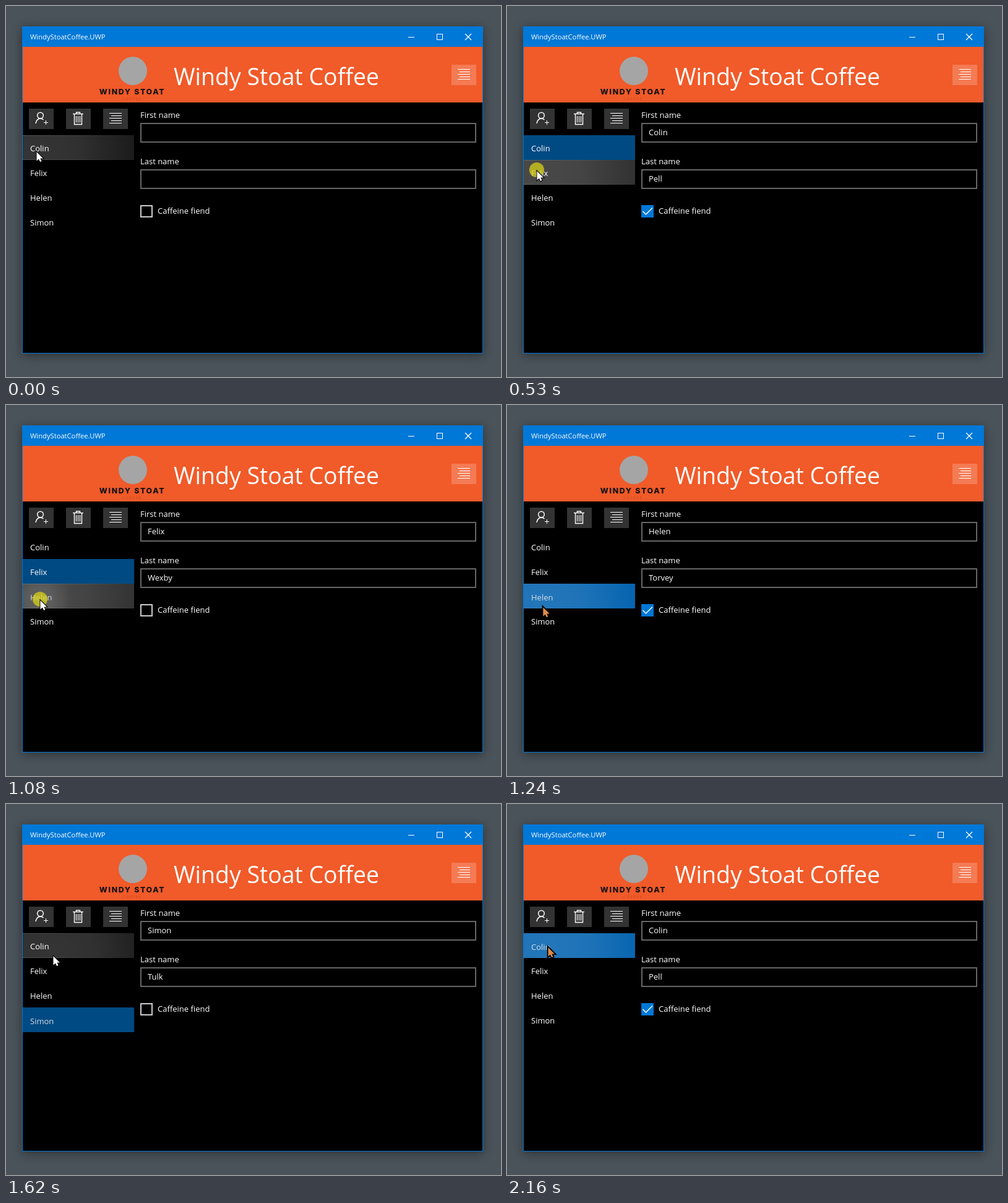
Recreate the animation shown at these times as an HTML page with a canvas. Size 800 by 600 pixels, loop 3160 ms.

```html
<!DOCTYPE html>
<html lang="en">
<head>
<meta charset="utf-8">
<title>Customer list</title>
<style>
  html, body { margin: 0; width: 100%; height: 100%; overflow: hidden; background: #4a535a; }
  canvas { display: block; }
</style>
</head>
<body>
<canvas id="stage" width="800" height="600"></canvas>
<script>
const ctx = document.getElementById('stage').getContext('2d');
const LOOP = 3160;
const STEP = 2160 / 28;
const LAST = 28;
const SANS = '"Open Sans", "Noto Sans", sans-serif';
const BLUE = '#0078d7';
const LIST = { x: 27, y: 209, w: 180, row: 40 };

const PEOPLE = [
  { first: 'Colin', last: 'Pell', fiend: true },
  { first: 'Felix', last: 'Wexby', fiend: false },
  { first: 'Helen', last: 'Torvey', fiend: true },
  { first: 'Simon', last: 'Tulk', fiend: false }
];

// Where the pointer rests, and from which step to which; with a row it presses there
const STOPS = [
  { x: 49, y: 235, from: 1, to: 2, row: 0 },
  { x: 48, y: 266, from: 7, to: 10, row: 1 },
  { x: 55, y: 315, from: 13, to: 15, row: 2 },
  { x: 66, y: 358, from: 18, to: 19, row: 3 },
  { x: 76, y: 245, from: 21, to: 21 },
  { x: 66, y: 231, from: 25, to: 27, row: 0 }
];
const CLICKS = STOPS.filter(s => 'row' in s);

const mix = (a, b, k) => a + (b - a) * k;
const smooth = k => k * k * (3 - 2 * k);
const clamp = k => Math.min(1, Math.max(0, k));

function box(x, y, w, h, color) {
  ctx.fillStyle = color;
  ctx.fillRect(x, y, w, h);
}

function frame(x, y, w, h, color, width) {
  ctx.strokeStyle = color;
  ctx.lineWidth = width;
  ctx.strokeRect(x, y, w, h);
}

function text(str, x, y, { size = 13, weight = 500, color = '#fff' } = {}) {
  ctx.font = `${weight} ${size}px ${SANS}`;
  ctx.fillStyle = color;
  ctx.fillText(str, x, y);
}

function line(width, ...points) {
  ctx.strokeStyle = '#fff';
  ctx.lineWidth = width;
  ctx.beginPath();
  for (const [x, y] of points) ctx.lineTo(x, y);
  ctx.stroke();
}

function disc(x, y, r, color) {
  ctx.fillStyle = color;
  ctx.beginPath();
  ctx.arc(x, y, r, 0, Math.PI * 2);
  ctx.fill();
}

function alignIcon(x, y) {
  for (let i = 0; i < 5; i++) {
    const indent = i % 2 * 3;
    box(x + indent, y + 4 * i, 20 - indent, 1, '#fff');
  }
}

function addIcon() {
  ctx.strokeStyle = '#fff';
  ctx.lineWidth = 1.5;
  ctx.beginPath();
  ctx.arc(55.5, 177, 4.8, 0, Math.PI * 2);
  ctx.moveTo(48, 190);
  ctx.bezierCurveTo(48.5, 185, 52, 182, 55.5, 182);
  ctx.quadraticCurveTo(58.5, 182, 60.5, 184);
  ctx.stroke();
  line(1, [61, 188.5], [68, 188.5]);
  line(1, [64.5, 185], [64.5, 192]);
}

function trashIcon() {
  line(1.4, [108, 174.5], [125, 174.5]);
  line(1.4, [113.5, 174], [113.5, 172], [119.5, 172], [119.5, 174]);
  line(1.4, [110.5, 175], [110.5, 191.5], [122.5, 191.5], [122.5, 175]);
  for (let x = 113.5; x < 120; x += 3) line(1.2, [x, 178], [x, 188.5]);
}

function logo() {
  disc(205, 105, 23, '#a5a5a5');
  ctx.textAlign = 'center';
  ctx.letterSpacing = '1.7px';
  ctx.font = '800 12.3px Inter, sans-serif';
  ctx.fillStyle = '#111';
  ctx.fillText('WINDY STOAT', 204, 143);
  text('COFFEE', 204, 152, { size: 6, color: '#c4481f' });
  ctx.letterSpacing = '0px';
  ctx.textAlign = 'left';
}

function chrome() {
  box(0, 0, 800, 600, '#4a535a');
  ctx.save();
  ctx.shadowColor = 'rgba(0,0,0,0.4)';
  ctx.shadowBlur = 16;
  ctx.shadowOffsetY = 3;
  box(26, 33, 745, 529, BLUE);
  ctx.restore();
  box(27, 66, 743, 90, '#f15a29');
  box(27, 156, 743, 405, '#000');

  text('WindyStoatCoffee.UWP', 39, 54, { size: 11.2 });
  box(650, 50, 10, 1, '#fff');
  frame(696.5, 45.5, 9, 9, '#fff', 1);
  line(1.2, [742, 45], [752, 55]);
  line(1.2, [752, 45], [742, 55]);

  logo();
  text('Windy Stoat Coffee', 271, 128, { size: 37.4, weight: 400 });
  box(720, 95, 40, 33, '#f47b54');
  alignIcon(730, 102);

  for (let i = 0; i < 3; i++) box(37 + 60 * i, 166, 40, 33, '#333');
  addIcon();
  trashIcon();
  alignIcon(167, 173);
}

function field(label, value, y) {
  text(label, 217, y);
  frame(218, y + 9, 541, 30, '#666', 2);
  text(value, 229, y + 28);
}

function form({ first = '', last = '', fiend = false } = {}) {
  field('First name', first, 181);
  field('Last name', last, 256);
  if (fiend) {
    box(217, 322, 20, 20, BLUE);
    line(1.5, [219.5, 332], [224.5, 337], [235, 326.5]);
  } else {
    frame(218, 323, 18, 18, '#ccc', 2);
  }
  text('Caffeine fiend', 245, 336);
}

function glow({ x, y }, r, alpha, top) {
  const g = ctx.createRadialGradient(x, y, 0, x, y, r);
  g.addColorStop(0, `rgba(255,255,255,${alpha})`);
  g.addColorStop(0.4, `rgba(255,255,255,${alpha * 0.85})`);
  g.addColorStop(1, 'rgba(255,255,255,0)');
  box(LIST.x, top, LIST.w, LIST.row, g);
}

function edges(top, alpha) {
  const g = ctx.createLinearGradient(LIST.x, 0, LIST.x + LIST.w, 0);
  g.addColorStop(0, `rgba(255,255,255,${alpha})`);
  g.addColorStop(1, 'rgba(255,255,255,0)');
  box(LIST.x, top, LIST.w, 1, g);
  box(LIST.x, top + LIST.row - 1, LIST.w, 1, g);
}

function list(step, pos, selected, click) {
  PEOPLE.forEach((person, i) => {
    const top = LIST.y + LIST.row * i;
    const hover = pos.y >= top && pos.y < top + LIST.row;
    const chosen = i === selected;
    const active = click && click.row === i;
    const pressed = active && step < click.to;
    const tilted = active && step > click.from && step <= click.from + 3;

    if (hover) {
      box(LIST.x, top, LIST.w, LIST.row, chosen ? '#0060ae' : pressed ? '#303030' : '#191919');
      glow(pos, 170, chosen ? 0.14 : 0.12, top);
      if (active && step > click.from && step <= click.to) glow(pos, 52, 0.13, top);
      edges(top, chosen ? 0.05 : 0.15);
    } else if (chosen) {
      box(LIST.x, top, LIST.w, LIST.row, '#004a83');
    }
    text(person.first, 39, top + (tilted ? 27 : 26), { color: tilted ? '#d4dde4' : '#fff' });
  });
}

function pointer({ x, y }, released) {
  const shape = [[0, 0], [0, 14.5], [3.4, 11.5], [5.6, 16], [8, 15], [5.9, 10.6], [10.4, 10.4]];
  ctx.beginPath();
  for (const [dx, dy] of shape) ctx.lineTo(x + 0.5 + dx, y + 1 + dy);
  ctx.closePath();
  ctx.strokeStyle = '#000';
  ctx.lineWidth = released ? 3.5 : 2;
  ctx.stroke();
  ctx.fillStyle = released ? '#dc8c4c' : '#fff';
  ctx.fill();
}

function pointerAt(step) {
  const i = Math.max(0, STOPS.filter(s => s.from <= step).length - 1);
  const a = STOPS[i];
  const b = STOPS[i + 1] || a;
  const k = a === b ? 0 : smooth(clamp((step - a.to) / (b.from - a.to)));
  return { x: mix(a.x, b.x, k), y: mix(a.y, b.y, k) };
}

function draw(step) {
  const pos = pointerAt(step);
  const click = CLICKS.filter(c => c.from <= step).pop();
  const done = CLICKS.filter(c => c.to <= step).pop();
  const selected = done ? done.row : -1;

  chrome();
  form(PEOPLE[selected]);
  list(step, pos, selected, click);
  if (click && step < click.to) disc(pos.x, pos.y - 1, 12, 'rgba(216,208,24,0.75)');
  pointer(pos, done && step < done.to + 2);
}

let origin;
function tick(now) {
  origin ??= now;
  const t = Math.max(0, now - origin) % LOOP;
  // Steps begin on a coarse clock, slightly ahead of the even beat
  draw(Math.min(LAST, Math.floor((t + 11) / STEP)));
  requestAnimationFrame(tick);
}
requestAnimationFrame(tick);
</script>
</body>
</html>
```
